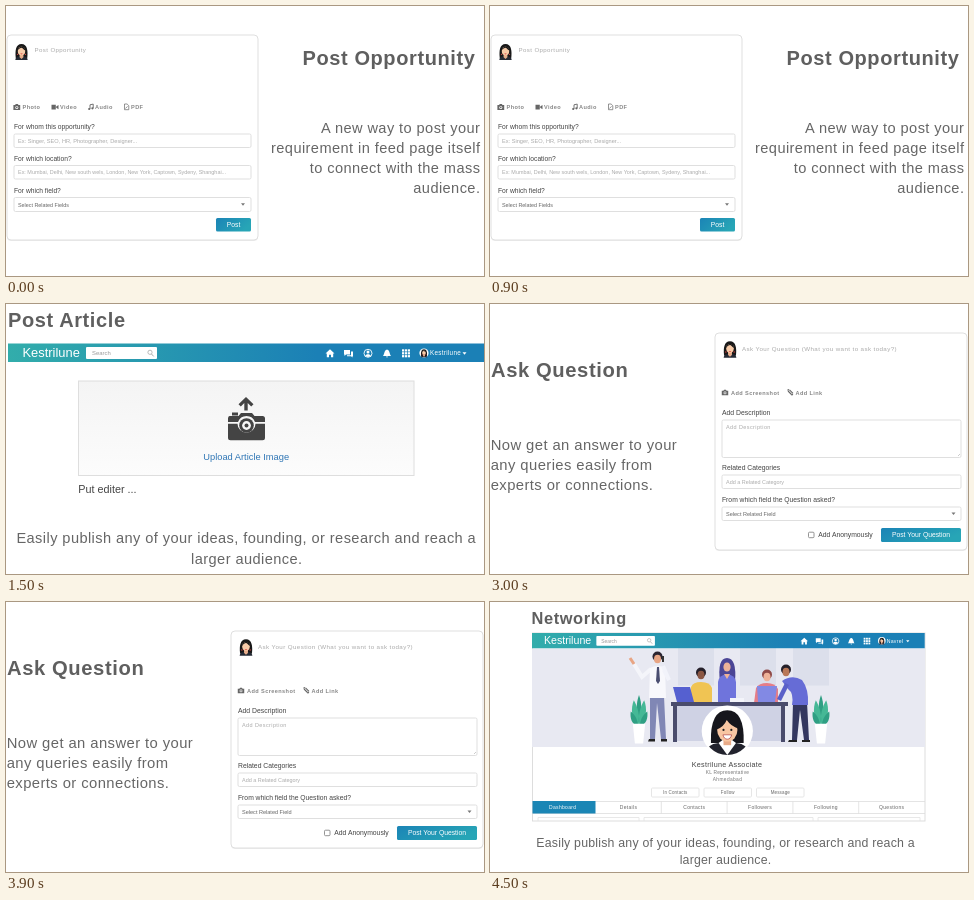
Recreate the animation shown at these times as an HTML page. Size 478 by 270 pixels, loop 6 s.

```html
<!DOCTYPE html>
<html lang="en">
<head>
<meta charset="utf-8">
<title>Feature tour</title>
<style>
  html, body { margin: 0; width: 100%; height: 100%; overflow: hidden; background: #fff; }
  svg { display: block; width: 100vw; height: 100vh; }
  text { font-family: Arial, "Liberation Sans", sans-serif; }
</style>
</head>
<body>
<svg id="stage" viewBox="0 0 478 270"></svg>
<script>
const BRAND = "Kestrilune";
const GREY = "#666", HINT = "#aaa", LABEL = "#444", DARK = "#222";

const text = (x, y, size, str, fill = GREY, extra = "") =>
  `<text x="${x}" y="${y}" font-size="${size}" fill="${fill}" ${extra}>${str}</text>`;
const track = n => `letter-spacing="${n}"`;
const mid = (x, y, size, str, fill, extra = "") =>
  text(x, y, size, str, fill, `text-anchor="middle" ${extra}`);
const title = (x, y, size, str) => text(x, y, size, str, "#5f5f5f", 'font-weight="bold" ' + track(.6));
const spaced = (x, y, size, str) => text(x, y, size, str, HINT, track(.4));
const tool = (x, y, str) => text(x, y, 5.6, str, "#888", 'font-weight="bold" ' + track(.4));
const rect = (x, y, w, h, fill, extra = "") =>
  `<rect x="${x}" y="${y}" width="${w}" height="${h}" fill="${fill}" ${extra}/>`;
const box = (x, y, w, h, r = 1.5, line = "#dcdcdc") =>
  rect(x, y, w, h, "#fff", `rx="${r}" stroke="${line}" stroke-width=".9"`);
const circle = (x, y, r, fill, extra = "") =>
  `<circle cx="${x}" cy="${y}" r="${r}" fill="${fill}" ${extra}/>`;
const path = (d, fill = "none", stroke = "none", w = 1) =>
  `<path d="${d}" fill="${fill}" stroke="${stroke}" stroke-width="${w}"/>`;
const at = (x, y, s, body) => `<g transform="translate(${x} ${y}) scale(${s})">${body}</g>`;

const card = (x, y, w, h) =>
  rect(x, y + 1, w, h, "#eee", 'rx="4"') + box(x, y, w, h, 4);
const caret = (x, y, fill) => path(`M${x - 2} ${y - 1}h4l-2 2.4z`, fill);
const button = (x, y, w, h, str) =>
  rect(x, y, w, h, "url(#btn)", 'rx="1.5"') + mid(x + w / 2, y + h / 2 + 2.4, 6.8, str, "#fff");

// Small avatar, centred on its face
const woman = `
  ${path("M-6 7C-7 -1 -6 -8 0 -8S7 -1 6 7z", "#181818")}
  ${path("M-6.5 9C-6 5 -3 5 0 5S6 5 6.5 9z", "#252a35")}
  ${path("M-2 3h4v3l-2 2-2-2z", "#e7ad8a")}
  <ellipse cy="-.5" rx="3.9" ry="4.6" fill="#f7cba8"/>
  ${path("M-4 -1C-4 -5 0 -5 1 -5S4 -4 4 -1C2 -2 1 -4 0 -4S-3 -3 -4 -1z", "#181818")}
  ${path("M-1.4 2.2h2.8l-1.4 1z", "#d33")}
  ${circle(-4.2, 3, .7, "#d44")}${circle(4.2, 3, .7, "#d44")}`;

const cameraIcon = path("M-3.4 -1.9h1.7l.7-1.1h2l.7 1.1h1.7v4.8h-6.8z", "#666") +
  circle(0, .4, 1.5, "#fff") + circle(0, .4, .8, "#666");

const navIcons = `
  ${path("M319.5 49.5l4.5-4.2 4.5 4.2h-1.3v3.8h-2.2v-2.6h-2v2.6h-2.2v-3.8z", "#fff")}
  ${path("M338 46h6v4.5h-4l-1.5 1.4v-1.4h-.5zM345 47.5h2v4.8h-.5v1.3l-1.5-1.3h-4v-1h4z", "#fff")}
  ${circle(362, 49.3, 4, "none", 'stroke="#fff" stroke-width=".9"')}
  ${circle(362, 48, 1.5, "#fff")}${path("M359.2 52c.5-2.4 5.1-2.4 5.6 0l-2.8 1z", "#fff")}
  ${path("M377 52c1.5-1.2 1-5.8 4-6.4 3 .6 2.5 5.2 4 6.4zM380 52.6h2l-1 1.2z", "#fff")}
  ${[0, 1, 2, 3, 4, 5, 6, 7, 8].map(i =>
    rect(396 + i % 3 * 2.9, 45.3 + (i / 3 | 0) * 2.9, 2.2, 2.2, "#fff")).join("")}
  ${circle(418, 49, 4.6, "#fff")}${at(418, 49, .48, woman)}`;

const nav = (user, shift, end) => `
  ${rect(2, 39.5, 476, 18.5, "url(#bar)")}
  ${text(16.5, 53, 12.9, BRAND, "#fff")}
  ${rect(80, 43, 71, 12, "#fff", 'rx="1"')}
  ${text(86, 51.3, 5.9, "Search", "#999")}
  ${circle(144, 48.3, 2.1, "none", 'stroke="#aaa" stroke-width=".8"')}
  ${path("M145.5 50l2.2 2.4", "none", "#aaa")}
  <g transform="translate(${shift})">${navIcons}
    ${text(424, 51.3, 6.3, user, "#fff", track(.3))}${caret(end, 49.3, "#fff")}</g>`;

const opportunity = `
  ${title(296.5, 58.7, 20, "Post Opportunity")}
  ${["A new way to post your", "requirement in feed page itself", "to connect with the mass", "audience."]
    .map((s, i) => text(474.4, 126.5 + i * 20.3, 14.6, s, GREY, 'text-anchor="end" ' + track(.42))).join("")}
  ${card(1, 29, 251, 205)}
  ${at(15.5, 45.5, .95, woman)}
  ${spaced(28.5, 46.3, 6.1, "Post Opportunity")}
  ${at(10.8, 101, 1, cameraIcon)}${tool(16.5, 103, "Photo")}
  ${path("M45.5 98.8h4.3v4.6h-4.3zM50.2 100.5l2.3-1.6v4.4l-2.3-1.6z", GREY)}${tool(54, 103, "Video")}
  ${path("M84 103v-4.2l3.2-.7v4.2", "none", GREY, .9)}${circle(83.2, 103, 1.1, GREY)}
  ${circle(86.4, 102.3, 1.1, GREY)}${tool(89, 103, "Audio")}
  ${path("M118.5 98h2.6l1.7 1.7v4h-4.3zM119.4 102.4l2.2-2", "none", GREY, .7)}${tool(125, 103, "PDF")}
  ${text(8, 123.3, 6.7, "For whom this opportunity?", LABEL)}
  ${box(8, 128, 237, 13.5)}
  ${text(12, 136.8, 5.65, "Ex: Singer, SEO, HR, Photographer, Designer...", HINT)}
  ${text(8, 155.3, 6.7, "For which location?", LABEL)}
  ${box(8, 159.5, 237, 13.5)}
  ${text(12, 168.3, 5.45, "Ex: Mumbai, Delhi, New south wels, London, New York, Captown, Sydeny, Shanghai...", HINT)}
  ${text(8, 187, 6.7, "For which field?", LABEL)}
  ${box(8, 191.5, 237, 14)}
  ${text(12, 200.5, 5.4, "Select Related Fields", GREY)}${caret(237, 198.3, "#777")}
  ${button(210, 212, 35, 13.5, "Post")}`;

const article = `
  ${title(2, 22.7, 20, "Post Article")}
  ${nav(BRAND, 0, 458.5)}
  ${rect(72.5, 77, 335.5, 94.5, "url(#panel)", 'stroke="#dedede"')}
  ${path("M240 93l7.5 7.2-2.3 2.2-3.5-3.4v7.5h-3.4v-7.5l-3.5 3.4-2.3-2.2z", "#444")}
  ${rect(226, 108.5, 6, 3, "#444")}
  ${path("M223.5 112h9l2.5-3h11l2.5 3h8q2.5 0 2.5 2.5v3.5h-10a9 9 0 0 0-17 0h-10v-3.5q0-2.5 1.5-2.5z", "#444")}
  ${path("M222 119.7h9.5a9 9 0 0 0 18 0h9.5v14q0 2.5-2.5 2.5h-32q-2.5 0-2.5-2.5z", "#444")}
  ${circle(240.5, 121.5, 7.3, "#444")}${circle(240.5, 121.5, 4.4, "#f7f7f7")}
  ${circle(240.5, 121.5, 2, "#444")}
  ${mid(240.2, 156, 9.3, "Upload Article Image", "#2f76b5")}
  ${text(72.3, 188.5, 10.8, "Put editer ...", "#444")}
  ${mid(240.3, 239.3, 14.6, "Easily publish any of your ideas, founding, or research and reach a", GREY, track(.42))}
  ${mid(240.8, 259.5, 14.6, "larger audience.", GREY, track(.42))}`;

const question = `
  ${title(1, 73, 20.2, "Ask Question")}
  ${["Now get an answer to your", "any queries easily from", "experts or connections."]
    .map((s, i) => text(.7, 145.5 + i * 20.3, 14.8, s, GREY, track(.42))).join("")}
  ${card(225, 29, 252, 217)}
  ${at(240, 45, .98, woman)}
  ${spaced(252, 46.5, 6.2, "Ask Your Question (What you want to ask today?)")}
  ${at(235, 88.5, .95, cameraIcon)}${tool(241, 90.6, "Add Screenshot")}
  ${path("M298 87l3.5 3.5M299.5 85.8l3.5 3.5M297.4 86.3l1.6-.8M301.5 91.2l1.5-1", "none", GREY, 1.1)}
  ${tool(305.5, 90.6, "Add Link")}
  ${text(232, 111.3, 6.85, "Add Description", LABEL)}
  ${box(232, 116, 239, 37.5)}
  ${spaced(236, 124.8, 5.5, "Add Description")}
  ${path("M468 152l2-2", "none", HINT, .6)}
  ${text(232, 165.5, 6.8, "Related Categories", LABEL)}
  ${box(232, 171, 239, 13.5)}
  ${text(236, 179.8, 5.45, "Add a Related Category", HINT)}
  ${text(232, 198.2, 6.75, "From which field the Question asked?", LABEL)}
  ${box(232, 203, 239, 13.5)}
  ${text(236, 211.8, 5.55, "Select Related Field", GREY)}${caret(463.5, 209.6, "#777")}
  ${box(318.5, 228.2, 5.5, 5.5, 1, "#888")}
  ${text(328.3, 233.4, 6.8, "Add Anonymously", LABEL)}
  ${button(391, 224, 80, 14, "Post Your Question")}`;

const plant = `
  ${path("M0 30C-3 18 -3 8 0 0 3 8 3 18 0 30z", "#2f9f83")}
  ${path("M0 30C-8 24 -8 12 -5 5 -1 12 1 20 0 30zM0 30C8 24 8 12 5 5 1 12 -1 20 0 30z", "#45b896")}
  ${path("M-1 30C-7 29 -9 22 -8 16 -3 20 -1 25 -1 30zM1 30C7 29 9 22 8 16 3 20 1 25 1 30z", "#2f9f83")}
  ${path("M-6 28H6L4 47h-8z", "#fff")}`;

const head = (x, y, skin, hair) =>
  circle(x, y - 1.5, 5, hair) + `<ellipse cx="${x}" cy="${y + 1}" rx="3.5" ry="4.3" fill="${skin}"/>`;

const office = `
  ${rect(42, 46.5, 393, 98.5, "#e8e9f2")}
  ${[188, 250, 303].map(x => rect(x, 46.5, 36, 37, "#dcdfeb")).join("")}
  ${at(149, 93, 1.03, plant)}${at(331, 93, 1.03, plant)}
  ${path("M160 94h14l2 43h-5l-4-36-2 36h-5z", "#8087b5")}
  ${path("M159 137h6v2.5h-7zM171 137h6v2.5h-6z", DARK)}
  ${path("M161 67l-9 8-8-13", "none", "#f4f5fa", 4)}${path("M144 62l-4-6", "none", "#e8a584", 3)}
  ${path("M160 66q8-4 15 0l1 30h-17z", "#f8f8fc")}${path("M174 68l5 10-6-14", "none", "#f2f3fa", 4)}
  ${path("M167 65h2l1 14-2 3-2-3z", "#4a4d70")}
  ${head(167.5, 56, "#e8a584", "#2b2430")}${rect(172, 54, 2, 6, "#333")}
  ${path("M230 80q-3-24 7-24t8 24z", "#4c4696")}
  ${path("M228 101v-21q1-7 9-8 8 1 9 8v21z", "#6f74dc")}${path("M234 72h6l-3 5z", "#eeb298")}
  <ellipse cx="237" cy="65" rx="3.6" ry="4.6" fill="#eeb298"/>
  ${path("M199 101l2-16q2-5 10-5 9 0 11 6v15z", "#f0c453")}${head(211, 72, "#8a5744", "#25202a")}
  ${path("M264 101l2-15q3-5 11-5t11 6v14z", "#e57d88")}${head(277, 74, "#eeb298", "#8f4a48")}
  ${path("M303 100h14l2 38h-5l-4-30-3 30h-5z", "#34375f")}
  ${path("M299 138h8v2h-9zM312 138h8v2h-8z", DARK)}
  ${path("M292 79q10-7 20-1 7 9 6 25h-16q2-12-4-16z", "#666cd6")}
  ${path("M297 82l-8 16", "none", "#5a60c8", 4.5)}${head(296, 69, "#b97857", "#25202a")}
  ${rect(187, 104, 105, 35, "#cfd2e4")}
  ${path("M183 85h17l4 15h-17z", "#5560d0")}${path("M267 84h20l-2 16h-17z", "#8289e4")}
  ${rect(240, 96, 14, 5, "#f3f4fa")}${rect(181, 100, 117, 4, "#4a4c6c")}
  ${path("M185 103v37M293 103v37", "none", "#4a4c6c", 4)}`;

const portrait = at(237.3, 129, 1.09, `
  ${circle(0, 0, 23.5, "#fff")}
  <clipPath id="round">${circle(0, 0, 22, "#000")}</clipPath>
  <g clip-path="url(#round)">
    ${path("M-15 11q-1-30 15-30t15 30z", "#16161c")}
    ${path("M-22 24q2-12 14-13H8q12 1 14 13z", "#22232d")}
    ${path("M-8 11l8 11 8-11-4-3h-8z", "#fff")}${rect(-3.5, 5, 7, 8, "#e8aa87")}
    <ellipse cy="-1" rx="9.3" ry="10.7" fill="#f8c6a2"/>
    ${path("M-10.500 -1q-1-15 10-15t11 14q-7-2-11-8-3 7-10 9z", "#16161c")}
    ${circle(-3.5, -1, 1, DARK)}${circle(3.7, -1, 1, DARK)}
    ${path("M-4 3.5h8q-1 4-4 4t-4-4z", "#fff", "#a33", .6)}
  </g>`);

const tabs = ["Dashboard", "Details", "Contacts", "Followers", "Following", "Questions"];
const networking = `
  ${title(41.5, 21.7, 16.4, "Networking")}
  ${rect(42.5, 31, 392.5, 188, "#fff", 'stroke="#ddd"')}
  ${office}
  <g transform="translate(42 31) scale(.825) translate(-2 -39.5)">${nav("Navrel", 8, 449.5)}</g>
  ${portrait}
  ${mid(237, 165, 7.2, BRAND + " Associate", "#444", track(.3))}
  ${mid(237.5, 172, 4.8, "KL Representative", "#777", track(.25))}
  ${mid(237.5, 178.5, 4.8, "Ahmedabad", "#777", track(.4))}
  ${["In Contacts", "Follow", "Message"].map((s, i) =>
    box(161.5 + i * 52.5, 186, 47.5, 9, 1, "#e4e4e4") +
    mid(185.3 + i * 52.5, 192.3, 4.5, s, GREY, track(.15))).join("")}
  ${path("M42 199.5H435M42 211.5H435", "none", "#ddd", .8)}
  ${rect(42.5, 199, 63, 12.5, "#1b86b5")}
  ${tabs.map((s, i) => mid(72.7 + i * 65.8, 207, 5, s, i ? GREY : "#fff", track(.3)) +
    (i > 1 ? path(`M${39.7 + i * 65.8} 199.5v12`, "none", "#ddd", .8) : "")).join("")}
  ${path("M48 219v-3.5H149V219M154 219v-3.5H323V219M328 219v-3.5H430V219", "none", "#e2e2e2", .8)}
  ${mid(235.6, 245, 12.35, "Easily publish any of your ideas, founding, or research and reach a", GREY, track(.2))}
  ${mid(235.5, 261.7, 12.35, "larger audience.", GREY, track(.2))}`;

const gradient = (id, a, b, dir) =>
  `<linearGradient id="${id}" ${dir}><stop stop-color="${a}"/><stop offset="1" stop-color="${b}"/></linearGradient>`;

const stage = document.getElementById("stage");
const scenes = [opportunity, article, question, networking];
stage.innerHTML = `<defs>
    ${gradient("bar", "#32adab", "#1b80b6", 'x2=".65"')}
    ${gradient("btn", "#1b84b6", "#27a5b6", 'x2="1" y2=".4"')}
    ${gradient("panel", "#f4f4f4", "#fcfcfc", 'x2="0" y2="1"')}
  </defs>` + scenes.map(s => `<g class="scene">${s}</g>`).join("");
const groups = stage.querySelectorAll(".scene");

const start = performance.now();
function draw() {
  const now = Math.floor((performance.now() - start) % 6000 / 1500);
  groups.forEach((g, i) => g.style.display = i === now ? "" : "none");
  requestAnimationFrame(draw);
}
draw();
</script>
</body>
</html>
```
